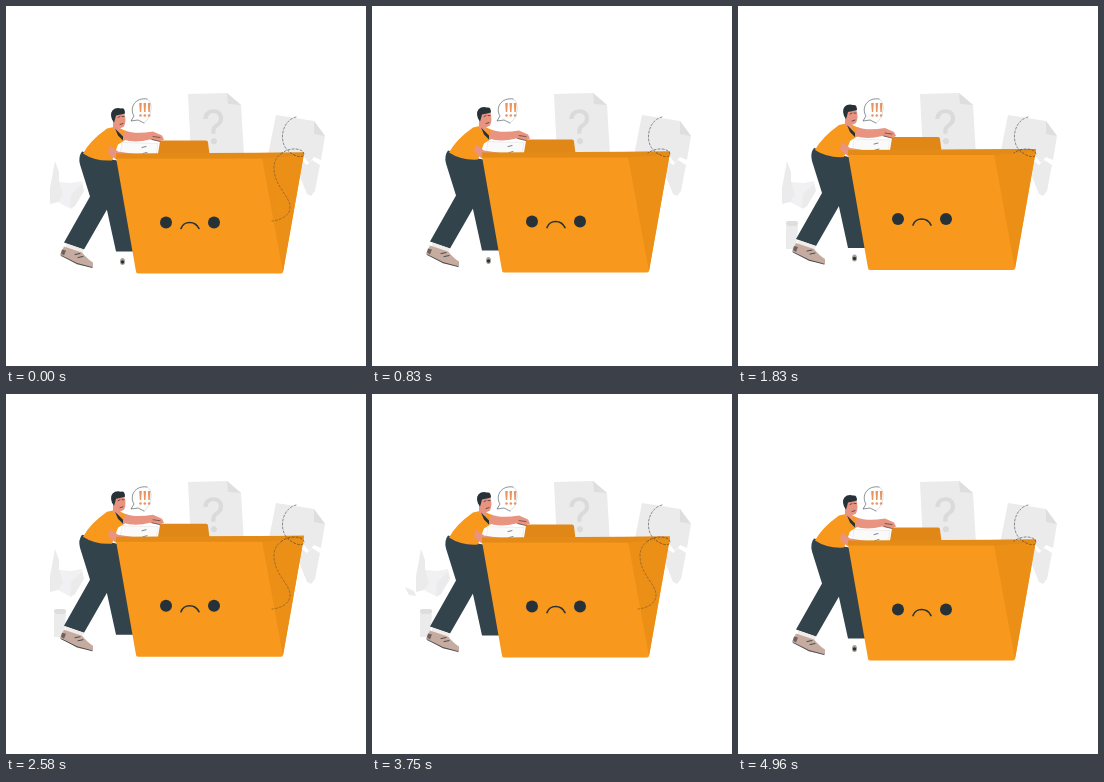
An HTML page for the animation above (5000 ms loop, 360 px wide and 360 px high).

```html
<!DOCTYPE html>
<html lang="en">
<meta charset="utf-8">
<title>Sad folder</title>
<style>
html, body { margin: 0; width: 100%; height: 100%; overflow: hidden; background: #fff }
svg { display: block; width: 100vw; height: 100vh }
text { font-family: Inter, Roboto, sans-serif }
.ink { fill: #263238 }
.cloth { fill: #33434c }
.line { fill: none; stroke: #263238; stroke-linecap: round; stroke-linejoin: round }
.skin { fill: #e99480 }
.shirt { fill: #f8991d }
.pale { fill: #ebebeb }
.shade { fill: #dedede }
</style>
<svg viewBox="0 0 360 360">
  <!-- litter -->
  <g id="crumple">
    <path d="M53 176l12 1 11-2 2 9-9 16-4 3-13-7z" fill="#f1f1f3"/>
    <path class="pale" d="M49 155l4 11 0 9 4 14-5 7-8 2 0-16z"/>
    <path class="pale" d="M65 188l11-10 2 7-9 15-5 2z"/>
  </g>
  <g id="cup">
    <path class="pale" d="M48 220h12l-2 23H48z"/>
    <rect class="shade" x="48" y="215" width="12" height="5" rx="2"/>
  </g>
  <path id="scrap" class="pale" d="M33 193l9 4 2 5-7-1z"/>

  <!-- sheets behind the folder -->
  <path class="pale" d="M182 88l39-1 14 12 3 50h-53z"/>
  <path class="shade" d="M221 87l14 12-13-1z"/>
  <text x="208" y="138" font-size="47" text-anchor="middle" fill="#dadada" transform="rotate(-4 208 121)">?</text>
  <path class="pale" d="M270 109l38 6 11 15-4 24-7-3-5 6-5-6-36-2z"/>
  <path class="shade" d="M308 115l11 15-11-2z"/>
  <path class="pale" d="M296 155l5 4 5-5 8 5-5 26-4 5-4-2-8-20z"/>

  <!-- speech bubble -->
  <path class="line" stroke-width=".7" opacity=".75" d="M141 93C129 91 123 102 128 110L125 115 132 114 138 117"/>
  <path class="line" stroke-width=".5" opacity=".3" d="M141 93Q146 95 145 104T138 117"/>
  <g id="marks" fill="#ea9460"></g>

  <g id="scene">
    <!-- far leg and shoe -->
    <path class="cloth" d="M84 151l27 3 11 45 8 46-20 0-12-55z"/>
    <g id="heel">
      <ellipse cx="116.500" cy="255" rx="2.500" ry="3.500" fill="#aaa19a"/>
      <circle class="ink" cx="116.500" cy="255.500" r="1.700"/>
    </g>

    <!-- folder back and carried sheets -->
    <path d="M151 153l3-18q0-1 2-1h44q2 0 2 2l2 16z" fill="#e08717"/>
    <path d="M110 148l188-2-3 8H113z" fill="#df8512"/>
    <path d="M116 136l36 1-2 12-36-1z" fill="#fafafa" stroke="#ddd" stroke-width=".5"/>
    <path class="line" stroke-width=".6" d="M136 141l4-1M137 147l4-1"/>

    <!-- near leg -->
    <path class="cloth" d="M76 145q-4 5-2 13l10 32-26 46 20 7 27-47 5-42z"/>
    <path d="M60 237l18 6-2 5-16-7z" fill="#f1ece9"/>
    <path d="M58 240l18 6q6 7 11 10v5l-16-3-17-10z" fill="#c6aca0"/>
    <path class="line" stroke-width=".8" d="M55 249l16 8 15 4M69 248l5-1M72 251l5-1"/>
    <path d="M56 243l4 1-2 5-3-2z" fill="#6d625d"/>

    <!-- torso, arms, head -->
    <path class="shirt" d="M77 147q7-13 24-25l9-2 11 5-1 8-8 5-6 16q-17 1-29-7z"/>
    <path class="skin" d="M119 124q10 4 28 1l9 4 2 4-4 2-10-2q-15 4-27 0z"/>
    <path class="skin" d="M104 139l8 6 20 3v3l-22 2q-5-3-8-7z"/>
    <path class="line" stroke-width=".6" d="M147 130l7 1M146 133l8 2"/>
    <path class="skin" d="M107 108l11-2q3 8 0 14l-4 2 1 4-8-3z"/>
    <path class="ink" d="M106 113q-3-8 3-11 3-1 6 0 4-1 4 5l-4 1-5 1-1 4-1 3zM109 122l8 8 0 4-5-5z"/>
    <path class="line" stroke-width=".7" d="M112 111l2-1M116 110l2 0M114 118l3-1"/>

    <!-- folder front -->
    <path d="M110 151h147l41-4-21 118q0 2-2 2H132q-2 0-2-2z" fill="#f8981c"/>
    <path d="M256 151l42-4-21 119z" fill="#ec8f17"/>
    <path d="M110 147l188-1-3 3-38 3H110z" fill="#e48a16"/>
    <circle class="ink" cx="160" cy="216" r="6"/>
    <circle class="ink" cx="208" cy="216" r="6"/>
    <path class="line" stroke-width="1.600" d="M175 222C178 214 189 214 193 222"/>
  </g>

  <!-- flight trail -->
  <g class="line" stroke-width=".7" stroke-dasharray="2 2" opacity=".75">
    <path d="M290 111C278 114 273 130 279 141 284 149 297 154 298 148 297 142 284 141 276 147"/>
    <path id="trail" opacity=".7" d="M276 147C270 151 268 156 268 162 268 180 284 190 284 201 284 209 276 214 266 215"/>
  </g>
</svg>
<script>
const $ = id => document.getElementById(id);
const LOOP = 5000;

$('marks').innerHTML = [134.5, 138.8, 143.1].map(x =>
  `<path d="M${x - 1.3} 97h2.600l-.6 9h-1.400z"/><circle cx="${x}" cy="109.500" r="1.300"/>`).join('');

const show = (id, on) => $(id).style.visibility = on ? 'visible' : 'hidden';

function draw(now) {
  const t = now % LOOP;
  const lift = 2.45 * (1 - Math.cos(Math.PI * t / 2900));
  $('scene').setAttribute('transform', `translate(0 ${0.5 - lift})`);
  show('crumple', t < 540 || t > 1380 && t < 4600);
  show('cup', t > 1670 && t < 4380);
  show('scrap', t > 2700 && t < 4380);
  show('trail', t < 540 || t > 2210 && t < 4330);
  show('heel', t < 2210 || t > 4600);
  requestAnimationFrame(draw);
}
requestAnimationFrame(draw);
</script>
</html>
```
